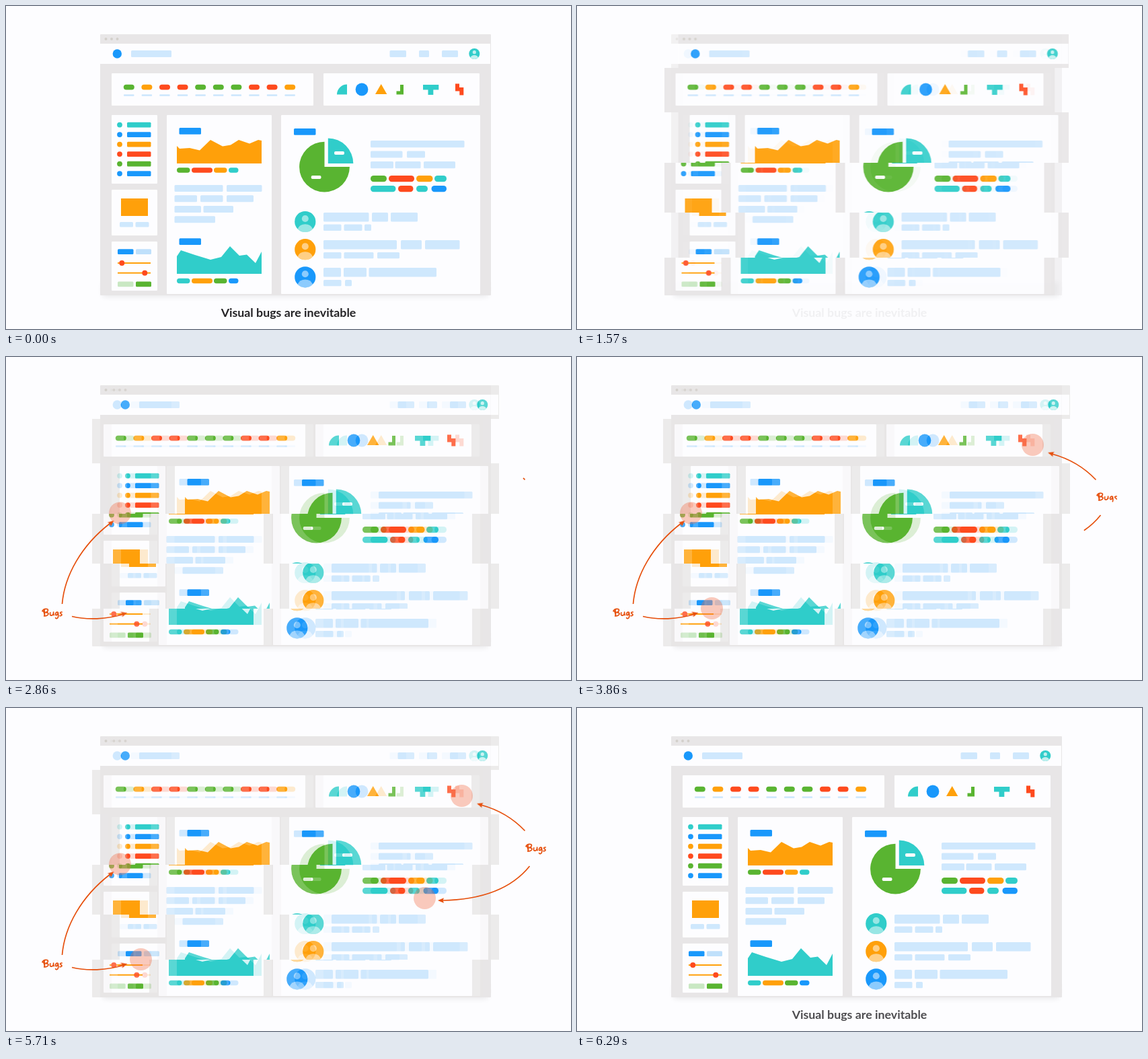
Write an HTML page that moves like this. It is 840 px wide and 480 px high and loops after 6.44 s.

```html
<!DOCTYPE html>
<html lang="en">
<head>
<meta charset="utf-8">
<title>Visual bugs are inevitable</title>
<style>
  html, body { margin: 0; width: 100%; height: 100%; overflow: hidden; background: #fdfdff; }
  svg { display: block; }
  .slice, .ghost, .sliced, .notes, .caption, .line, .pop {
    animation: 6440ms linear infinite both;
  }
  .slice { animation-name: slide; animation-timing-function: ease-in-out; }
  .ghost { animation-name: ghost; }
  .sliced { animation-name: veil; }
  .notes { animation-name: notes; }
  .caption {
    animation-name: caption;
    font: 700 17.8px Lato, "Open Sans", sans-serif;
    text-anchor: middle;
    fill: #242326;
  }
  .line {
    animation-name: draw;
    fill: none; stroke: #e64f0c; stroke-width: 1.7;
    stroke-linejoin: round; stroke-dasharray: 1 2;
  }
  .pop { animation-name: pop; }
  .head { fill: #e64f0c; }
  .spot { fill: rgb(240 110 70 / .36); }

  @keyframes slide {
    0%, 17.9% { transform: none; }
    26.5%, 88.8% { transform: translateX(var(--d)); }
    97.7%, 100% { transform: none; }
  }
  @keyframes ghost {
    0%, 22.2% { opacity: 0; }
    26.5%, 88.8% { opacity: 1; }
    93%, 100% { opacity: 0; }
  }
  @keyframes veil {
    0%, 22.2% { opacity: 1; }
    26.5%, 88.8% { opacity: .8; }
    93% { opacity: .92; }
    97.7%, 100% { opacity: 1; }
  }
  @keyframes caption {
    0%, 17.9% { opacity: 1; }
    24.8%, 93% { opacity: 0; }
    98.8%, 100% { opacity: 1; }
  }
  @keyframes notes {
    0%, 28.8% { opacity: 0; }
    28.9%, 88.8% { opacity: 1; }
    92.2%, 100% { opacity: 0; }
  }
  /* Delayed per element; each clears itself while the notes are hidden. */
  @keyframes draw {
    0% { stroke-dashoffset: 1; }
    5.4%, 62.8% { stroke-dashoffset: 0; }
    62.9%, 100% { stroke-dashoffset: 1; }
  }
  @keyframes pop {
    0% { opacity: 0; }
    1.6%, 62.8% { opacity: 1; }
    62.9%, 100% { opacity: 0; }
  }
</style>
</head>
<body>
<svg id="stage" width="840" height="480" viewBox="0 0 840 480"></svg>
<script>
const C = {
  b: '#1998fb', t: '#30cdca', g: '#59b431', o: '#ffa00a', r: '#fe4a1e',
  p: '#cfe8fd', w: '#fdfdff', k: '#e8e6e7', l: '#bfe0fb', m: '#c9e8c3'
};

const box = (x1, y1, x2, y2, c, r = 0) =>
  `<rect x="${x1}" y="${y1}" width="${x2 - x1}" height="${y2 - y1}" rx="${r}" fill="${C[c]}"/>`;
const dot = (x, y, r, c) => `<circle cx="${x}" cy="${y}" r="${r}" fill="${C[c] || c}"/>`;
const shape = (d, c) => `<path d="${d}" fill="${C[c]}"/>`;

// A row of bars; xs holds start and end pairs, colours cycle.
const row = (y, h, colours, r, ...xs) => {
  let out = '';
  for (let i = 0; i < xs.length; i += 2)
    out += box(xs[i], y, xs[i + 1], y + h, colours[i / 2 % colours.length], r);
  return out;
};

const avatar = (x, y, r, c, a = .5) =>
  `<g transform="translate(${x} ${y}) scale(${r / 15.5})">${dot(0, 0, 15.5, c)}
   <g fill="#fff" opacity="${a}"><circle cy="-4.5" r="5"/>
   <path d="M-11.2 10.7A12 11 0 0 1 11.2 10.7A15.5 15.5 0 0 1-11.2 10.7Z"/></g></g>`;

const frame = () =>
  box(140, 42, 721, 430, 'k', 1) + box(140, 56, 720, 86, 'w') +
  [148.5, 157, 165.5].map(x => dot(x, 49, 2, '#d3d0cb')).join('') +
  dot(165.3, 71, 6.7, 'b') +
  row(66, 10, 'p', 1.5, 186, 246, 570.5, 595, 614, 629, 648, 672) +
  avatar(696.3, 71, 8, 't', .7) +
  row(100, 48, 'w', 1, 157, 457, 472, 704) +
  box(157, 162, 225, 264, 'w', 1) + box(157, 273, 225, 341, 'w', 1) +
  box(157, 350, 225, 423, 'w', 1) + row(162, 266, 'w', 1, 239, 395, 409, 705);

const topRow = () =>
  [...'gorrgggrro'].map((c, i) => {
    const x = 182.8 + i * 26.6;
    return box(x - 8, 116.7, x + 8, 124.5, c, 3.9) + box(x - 7.8, 131.3, x + 7.7, 134, 'p', 1);
  }).join('') +
  shape('M492 131.5A15 15 0 0 1 507 116.5V131.5Z', 't') + dot(529, 124, 9.4, 'b') +
  shape('M549 131L557.7 116L566.3 131Z', 'o') +
  shape('M586 117H591V131.5H580.5V126.5H586Z', 'g') +
  shape('M620 117H643.3V124.5H635.3V132H627.5V124.5H620Z', 't') +
  shape('M668 115.5H674V121H680.3V132.5H674.3V126.5H668Z', 'r');

const sidebar = () =>
  [...'tborgb'].map((c, i) => {
    const y = 176.6 + i * 14.5;
    return dot(169, y, 3.9, c) + box(180, y - 3.8, 215.5, y + 3.8, c, 1.5);
  }).join('') +
  box(171, 286, 211, 312, 'o') + row(321, 7.5, 'p', 1.5, 169, 189, 192.5, 212.5) +
  row(361.3, 7.7, 'bl', 1.5, 166, 189.5, 193, 216) +
  box(166, 381, 215, 383, 'o') + dot(172.3, 382, 4, 'r') +
  box(166, 395.7, 215, 397.7, 'o') + dot(206.3, 396.7, 4, 'r') +
  row(409.5, 7.7, 'mg', 1.5, 166, 189.5, 193, 216);

const charts = () =>
  row(181, 9.7, 'b', 1.5, 257.5, 290) +
  shape('M254 234V208L258 212L273 211L288 214.5L304 199L322 208.5L334 206.5L346 199L362 204.5L375 199L380 200V234Z', 'o') +
  row(240.2, 7.5, 'grot', 3.7, 254, 273.5, 276, 307, 309, 328.5, 331, 345.5) +
  row(266, 10, 'p', 1.5, 250.5, 322.5, 328, 380.5) +
  row(281.3, 10, 'p', 1.5, 250.5, 284, 289, 322.5, 328, 368) +
  row(297, 10, 'p', 1.5, 250.5, 290, 293.5, 338) +
  row(312.3, 10, 'p', 1.5, 250.5, 311) +
  row(345.3, 9.7, 'b', 1.5, 257.5, 290) +
  shape('M254 398V372L260 363L281 370L304 377L320 373L333 357L347 371L358 369.5L371 382L380 365V398Z', 't') +
  row(404.7, 7.5, 'togb', 3.7, 254, 273.5, 276, 307, 309, 328.5, 331, 345.5);

const report = () =>
  row(182, 9.7, 'b', 1.5, 428, 460.5) +
  shape('M473.5 239V201.7A37.4 37.4 0 1 0 510.9 239Z', 'g') +
  shape('M478.8 234V196.5A37.5 37.5 0 0 1 516.3 234Z', 't') +
  box(488, 216, 503, 221, 'w', 2) + box(453.7, 252, 468.5, 257, 'w', 2) +
  row(200, 10.3, 'p', 1.5, 542, 681.5) +
  row(215.5, 10, 'p', 1.5, 542, 589.5, 596, 623) +
  row(231, 10.3, 'p', 1.5, 542, 576, 578.5, 616.5, 621, 668) +
  row(252, 9.3, 'grot', 4.5, 542, 566, 569, 607, 610, 634.5, 637, 655) +
  row(267, 9.3, 'trtb', 4.5, 542, 579.5, 583, 605.5, 610, 627, 632.5, 655) +
  avatar(444.8, 320.5, 15.6, 't') + avatar(444.8, 361.7, 15.6, 'o') + avatar(444.8, 402.8, 15.6, 'b') +
  row(307, 13.6, 'p', 1.5, 472, 539.5, 544, 568, 572, 612) +
  row(324.5, 9.5, 'p', 1.5, 472, 498.5, 502.5, 529.5, 533, 543) +
  row(348, 13.6, 'p', 1.5, 472, 581, 587, 618, 623, 674.5) +
  row(366, 9.3, 'p', 1.5, 472, 498.5, 502.5, 546.5, 552, 585) +
  row(389, 13.6, 'p', 1.5, 472, 498, 502, 536, 539.5, 640) +
  row(407, 9.3, 'p', 1.5, 472, 498.5, 504, 514);

// Alternate slices of the window move right and left.
const cuts = [42, 92, 158, 233, 307, 374, 432];
const slices = () => cuts.slice(1).map((end, i) => {
  const y = cuts[i], h = end - y;
  return `<g class="slice" style="--d:${i % 2 ? -12 : 12}px">
    <svg y="${y}" width="840" height="${h}" viewBox="0 ${y} 840 ${h}"><use href="#win"/></svg></g>`;
}).join('');

const line = (d, at) =>
  `<path class="line" d="${d}" pathLength="1" style="animation-delay:${at}ms"/>`;

const letters = [
  'M4 2L4.6 11.6C3.6 7 3.5 4 1 4.6C3 .6 10 .4 9.4 3.6C9 5.6 7 6.3 5.4 6.6C9.6 6.2 11 8.4 9 10.3C7.4 11.8 5 12 3 11.6',
  'M13 6.2C12 9 12.4 11.4 14.4 11.2C16.6 11 17.6 8.4 17.6 6.2C17.4 8.4 17.6 10 18.6 11.2',
  'M24.4 6.6C22 5.2 19.8 8 20.7 10.2C22.2 11.6 24 9 24.4 6.6C25.2 11 25 15.2 22.4 15.6C21 15.7 20.4 14.8 20.8 14',
  'M30.8 6.2C28.2 5.4 26.6 7.4 28.6 8.6C31 9.7 30.4 12.2 26.4 11.4'
];
const word = (x, y, at) =>
  `<g transform="translate(${x} ${y})" role="img" aria-label="Bugs">` +
  letters.map((d, i) => line(d, at + i * 40)).join('') + '</g>';

// Curved arrow to (x, y) pointing at angle a, then a spot at (cx, cy).
const arrow = (d, x, y, a, cx, cy, at) =>
  line(d, at) +
  `<path class="pop head" d="M0 0L-9-3.8L-7.6 0L-9 3.8Z" transform="translate(${x} ${y}) rotate(${a})" style="animation-delay:${at + 290}ms"/>` +
  `<circle class="pop spot" cx="${cx}" cy="${cy}" r="16.5" style="animation-delay:${at + 400}ms"/>`;

document.getElementById('stage').innerHTML = `
  <defs>
    <g id="win">${frame() + topRow() + sidebar() + charts() + report()}</g>
    <filter id="soft" x="-10%" y="-80%" width="120%" height="260%"><feGaussianBlur stdDeviation="4"/></filter>
  </defs>
  <rect x="144" y="410" width="572" height="22" opacity=".08" filter="url(#soft)"/>
  <use class="ghost" href="#win"/>
  <g class="sliced">${slices()}</g>
  <text class="caption" x="420" y="462">Visual bugs are inevitable</text>
  <g class="notes">
    ${word(53, 373, 1880)}
    ${arrow('M83.5 367C87 325 112 280 155 247', 160.5, 243, -39, 169.5, 232, 2130)}
    ${arrow('M98 385.5C120 391 150 390 175 382', 180.5, 380, -17, 200.5, 373.5, 2480)}
    ${arrow('M771.5 182.5C754 164 732 151 706 144', 700, 142, 197, 677.5, 130.5, 2845)}
    ${word(772, 201, 3500)}
    ${arrow('M778.5 235C752 268 708 285 648 286', 642, 286, 180, 622.5, 282.5, 3780)}
  </g>`;
</script>
</body>
</html>
```
